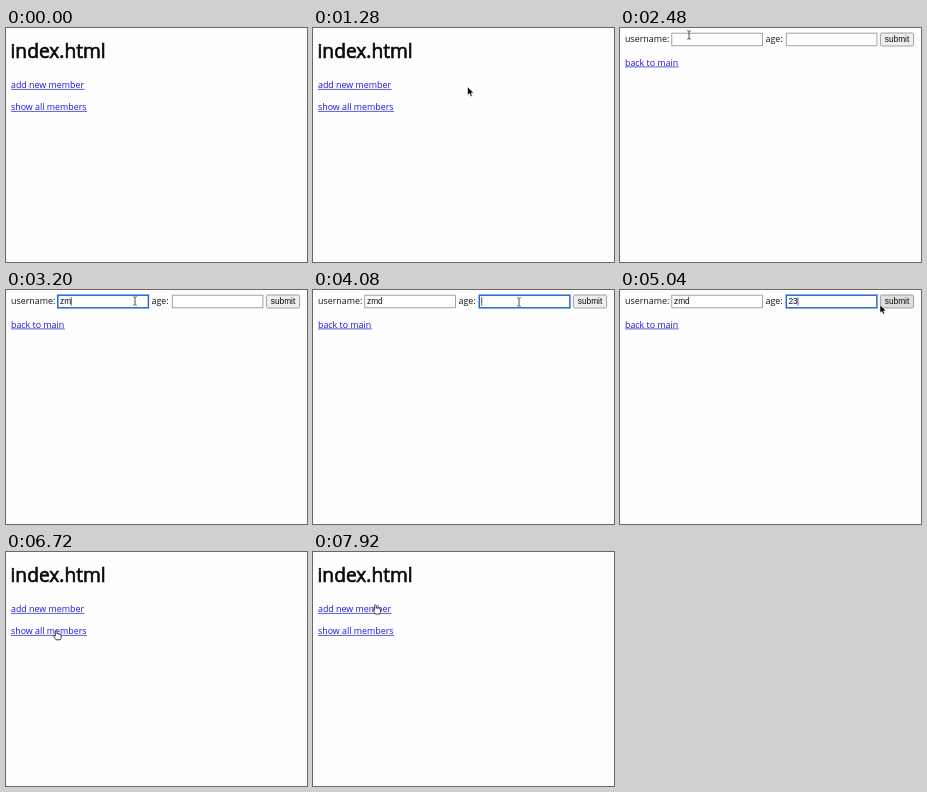
Animation of 301 by 234 pixels, one loop 8000 ms. Source, as an HTML page:

```html
<!DOCTYPE html>
<html lang="en">
<head>
<meta charset="utf-8">
<title>Member form</title>
<style>
  html, body { margin: 0; width: 100%; height: 100%; overflow: hidden; background: #fefefe; }
  svg { display: block; width: 100%; height: 100%; }
  text { font: 8.9px "Open Sans", "Noto Sans", sans-serif; fill: #151515; white-space: pre; }
  .title { font-size: 19.2px; fill: #080808; stroke: #080808; stroke-width: .65px; }
  .link { fill: #1a18d8; }
  .rule { stroke: #1a18d8; stroke-width: .7; }
  .ui { font: 8.3px "Liberation Sans", Arial, sans-serif; fill: #0a0a0a; }
  .field { fill: #fff; stroke: #8c8c8c; stroke-width: .8; }
  .focus { stroke: #2469d8; stroke-width: 1.5; }
  .caret { stroke: #111; stroke-width: .7; }
</style>
</head>
<body>
<svg id="stage" viewBox="0 0 301 234" xmlns="http://www.w3.org/2000/svg">
  <rect width="301" height="234" fill="#fefefe"/>
  <g id="index"><text class="title" x="4.5" y="30">index.html</text></g>
  <g id="form">
    <text x="5" y="13.5">username:</text>
    <text x="145.5" y="13.5">age:</text>
    <rect id="submit" x="260.4" y="5" width="33.2" height="13" rx="1.5" stroke="#8c8c8c" stroke-width=".8"/>
    <text class="ui" x="277" y="14.3" text-anchor="middle">submit</text>
  </g>
  <g id="result"></g>
  <g id="pointer">
    <path id="arrow" d="M0 0V8.4L1.9 6.7L3.2 9.6L4.7 9L3.5 6.2H6.1Z" fill="#000" stroke="#fff" stroke-width=".6"/>
    <path id="hand" d="M-.9 .6Q0 -.6 .8 .6V3.3Q1.7 2.6 2.3 3.5Q3.2 3 3.7 3.9Q4.9 3.5 5 4.7V6.6Q4.9 8 4.1 9.3H-.1Q-.9 7.8 -2.6 5.7Q-2.8 4.5 -1.6 4.9L-.9 5.6Z" fill="#fff" stroke="#111" stroke-width=".8" stroke-linejoin="round"/>
    <path id="beam" d="M-1.7 -4.3Q-.2 -4.3 0 -3.3Q.2 -4.3 1.7 -4.3M0 -3.3V3.3M-1.7 4.3Q-.2 4.3 0 3.3Q.2 4.3 1.7 4.3" fill="none" stroke="#222" stroke-width=".8"/>
  </g>
</svg>
<script>
const NS = 'http://www.w3.org/2000/svg';
const LOOP = 8000, STEP = 80;
const NAME = 'zmd', AGE = '23';
const $ = id => document.getElementById(id);

function add(parent, tag, attrs, content = '') {
  const el = document.createElementNS(NS, tag);
  for (const key in attrs) el.setAttribute(key, attrs[key]);
  el.textContent = content;
  return parent.appendChild(el);
}

const label = (page, y, content) => add($(page), 'text', { x: 5, y }, content);

function link(page, y, width, content) {
  add($(page), 'text', { class: 'link', x: 5, y }, content);
  add($(page), 'path', { class: 'rule', d: `M5 ${y + 1.4}h${width}` });
  return { page, x: 5, y: y - 9, w: width, h: 11.5 };
}

function field(x) {
  return {
    page: 'form', x, y: 5, w: 91, h: 13,
    box: add($('form'), 'rect', { x, y: 5.2, width: 90.6, height: 12.6 }),
    text: add($('form'), 'text', { class: 'ui', x: x + 2.2, y: 14.3 }),
    caret: add($('form'), 'path', { class: 'caret' })
  };
}

const links = [
  link('index', 60, 73.6, 'add new member'),
  link('index', 82, 76, 'show all members'),
  link('form', 37.5, 53.8, 'back to main'),
  link('result', 80, 53.8, 'back to main')
];
label('result', 13.5, 'id: 1');
label('result', 35.5, 'username: ' + NAME);
label('result', 57.5, 'age: ' + AGE);

const user = field(51.8), age = field(166.3);
const button = { page: 'form', x: 259.5, y: 5, w: 34.5, h: 13 };

// Pointer stops: time, x, y
const path = [
  [800, 274, 83], [1200, 160, 58], [1600, 108, 66], [2080, 99.5, 72.5],
  [2240, 64, 55], [2320, 64, 55], [2480, 69, 7], [2560, 69, 6], [2640, 69, 6],
  [3040, 129, 11], [3520, 129, 11], [4000, 206, 12], [4640, 206, 12],
  [5040, 260, 14.7], [5200, 266, 12], [5360, 266, 12], [5680, 238.7, 39],
  [6000, 36, 76], [6400, 36, 76], [6720, 50.2, 78.5], [7120, 52, 78],
  [7280, 52, 78], [7600, 62.5, 52.8]
];
const pages = [[0, 'index'], [2320, 'form'], [5360, 'result'], [6400, 'index']];
const nameKeys = [3040, 3200, 3360], ageKeys = [4400, 4560];

function pointerAt(t) {
  const i = path.findIndex(p => p[0] > t);
  if (i < 0) return path[path.length - 1].slice(1);
  const [t0, x0, y0] = path[i - 1], [t1, x1, y1] = path[i];
  const u = (t - t0) / (t1 - t0), k = u * u * (3 - 2 * u);
  return [x0 + (x1 - x0) * k, y0 + (y1 - y0) * k];
}

const show = (id, on) => $(id).setAttribute('display', on ? 'inline' : 'none');
const typed = (word, keys, t) => word.slice(0, keys.filter(k => k <= t).length);

function setField(f, value, focused) {
  f.text.textContent = value;
  f.box.setAttribute('class', focused ? 'field focus' : 'field');
  const x = f.x + 2.4 + (value ? f.text.getComputedTextLength() : 0);
  f.caret.setAttribute('d', focused ? `M${x} 7.2v8.4` : '');
}

function render(t) {
  const page = pages.filter(p => p[0] <= t).pop()[1];
  for (const id of ['index', 'form', 'result']) show(id, id === page);
  if (page === 'form') {
    setField(user, typed(NAME, nameKeys, t), t >= 2720 && t < 3840);
    setField(age, typed(AGE, ageKeys, t), t >= 3840);
  }

  show('pointer', t >= path[0][0]);
  if (t < path[0][0]) return;
  const [x, y] = pointerAt(t);
  const over = r => r.page === page && x >= r.x && x <= r.x + r.w && y >= r.y && y <= r.y + r.h;
  const hand = links.some(over), beam = over(user) || over(age);
  show('hand', hand);
  show('beam', beam);
  show('arrow', !hand && !beam);
  $('submit').setAttribute('fill', over(button) ? '#dedede' : '#eeeeee');
  $('pointer').setAttribute('transform', `translate(${x} ${y})`);
}

const start = performance.now();
function tick() {
  const t = (performance.now() - start) % LOOP;
  render(Math.floor(t / STEP) * STEP);
  requestAnimationFrame(tick);
}
$('submit').setAttribute('fill', '#eeeeee');
tick();
</script>
</body>
</html>
```
